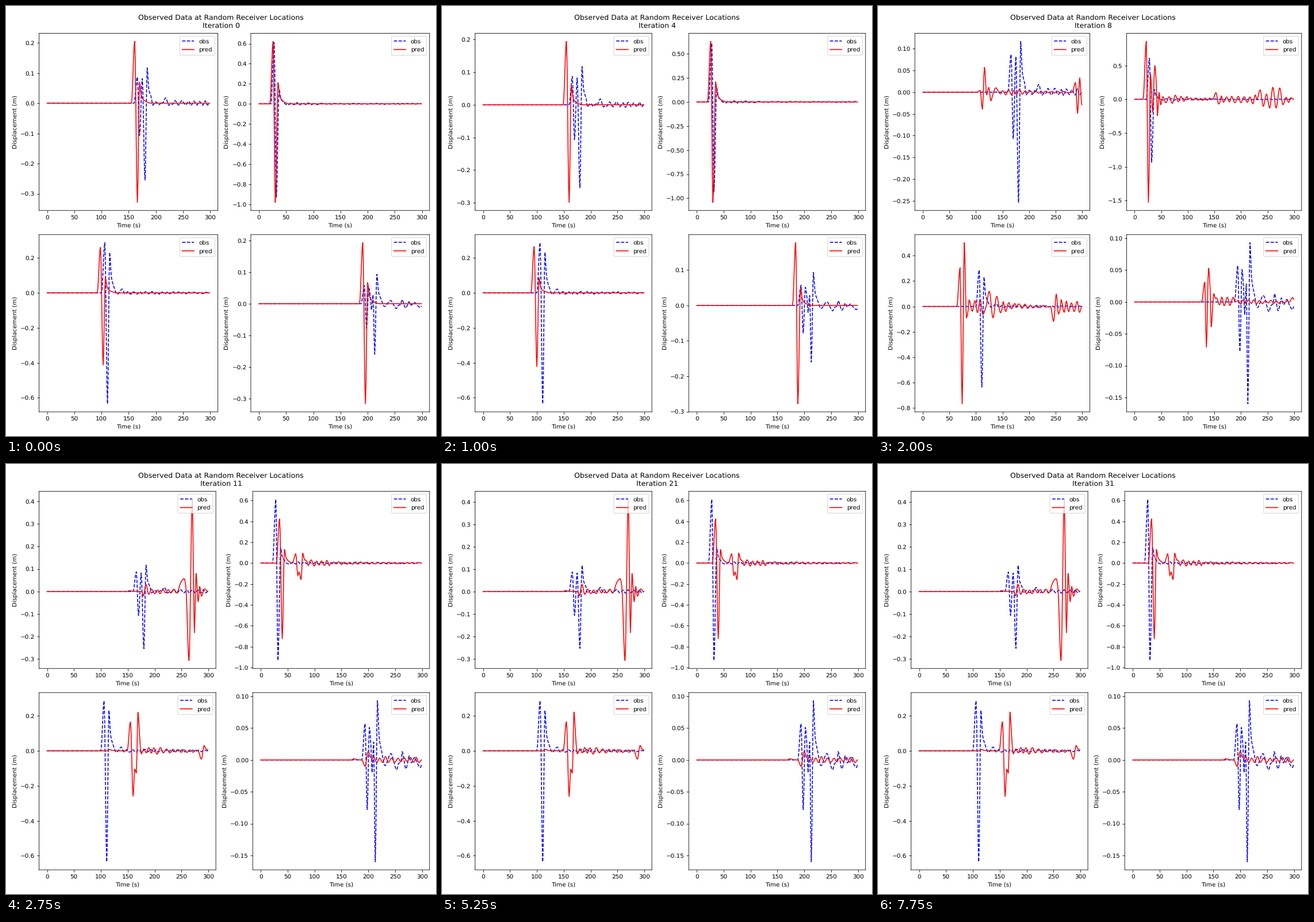
These frames come from a looping animation (748x748 px, 8 s). A matplotlib script:

```python
import numpy as np
import matplotlib.pyplot as plt
from matplotlib.animation import FuncAnimation

FRAMES, INTERVAL = 32, 250
T = np.arange(300)
PRE, POST = 6, ((3, 0.4), (8, 0.14), (22, 0))  # lead-in time, decaying tail


def burst(start, step, *amps):
    """Evenly spaced extremes in thousandths, with a decaying tail."""
    knots = [(round(start + i * step), a) for i, a in enumerate(amps)]
    end, last = knots[-1]
    return knots + [(end + dt, last * f) for dt, f in POST]


def ripple(start, end, amp, last=None):
    """Seeded swings of alternating sign, from size amp to size last."""
    rng = np.random.default_rng(start)
    last = amp if last is None else last
    knots, t = [], start
    while t < end:
        size = amp + (last - amp) * (t - start) / (end - start)
        knots.append((t, size * rng.uniform(0.5, 1) * (-1) ** len(knots)))
        t += rng.uniform(4, 6.5)
    return knots


def trace(*parts):
    """Join the parts and return a smooth curve without overshoot."""
    knots = [(0, 0)]
    for part in parts:
        start = part[0][0]
        knots = [k for k in knots if k[0] < start - 1]
        if knots[-1][0] < start - PRE:
            knots.append((start - PRE, 0))
        knots += part
    if knots[-1][0] < T[-1]:
        knots.append((T[-1], 0))
    k, v = np.array(knots, float).T
    v = v / 1000
    h = np.diff(k)
    d = np.diff(v) / h
    m = np.zeros_like(v)
    same = d[:-1] * d[1:] > 0
    m[1:-1][same] = (2 * d[:-1] * d[1:])[same] / (d[:-1] + d[1:])[same]

    def at(t):
        t = np.clip(t, k[0], k[-1])
        i = np.clip(np.searchsorted(k, t, "right") - 1, 0, len(h) - 1)
        s = (t - k[i]) / h[i]
        return (v[i] * (1 + 2 * s) * (1 - s) ** 2 + v[i + 1] * s * s * (3 - 2 * s)
                + h[i] * s * (1 - s) * (m[i] * (1 - s) - m[i + 1] * s))

    return at


class Panel:
    """One receiver: the prediction drifts early, breaks up, then settles."""

    def __init__(self, obs, first, fourth, wild, onset, settled, drift):
        self.obs = obs(T)
        self.first, self.fourth = np.array(first), np.array(fourth)
        self.wild, self.onset = wild, onset
        self.settled, self.drift = settled, drift

    def clean(self, n):
        p, up, down, back = self.first + (self.fourth - self.first) * n / 4
        return trace(burst(p, 4.5, up, -down, back))

    def pred(self, n):
        if n <= 4:
            return self.clean(n)(T)
        if n <= 8:
            u = ((n - 4) / 4) ** 1.6
            gap = self.fourth[0] - self.onset
            return ((1 - u) * self.clean(4)(T + u * gap)
                    + u * self.wild(T - (1 - u) * gap))
        w = max(0, 1 - 0.7 * (n - 8))
        scale = 1 - self.drift * 0.4 ** (n - 11)
        return w * self.wild(T) + (1 - w) * scale * self.settled(T)


top_left = Panel(
    obs=trace(burst(166, 4.5, 87, -107, 82, -254, 117), ripple(194, 213, -7),
              burst(218, 6, 18, -7), ripple(230, 296, -9)),
    first=(161, 205, 329, 70), fourth=(155, 194, 299, 59),
    wild=trace(burst(108, 4, 4, -39, 57, -6), burst(124, 4.5, 11, -20),
               burst(137, 9, 10, -4), ripple(150, 190, 7), ripple(192, 270, 3, 2),
               burst(287, 4, 22, -49, 33, -29)),
    onset=113,
    settled=trace(burst(154, 6, 4), burst(179, 5, -20, 32, -13, 10),
                  ripple(200, 242, -13), burst(249, 6, 42, 57),
                  burst(264, 6, -308, 411), burst(274, 3.3, -184, 80, -46, 22),
                  ripple(287, 298, -23)),
    drift=0.006)

top_right = Panel(
    obs=trace(burst(28, 4.4, 610, -932, 147), ripple(54, 115, -17, -8),
              ripple(118, 296, 5)),
    first=(26, 623, 983, 212), fourth=(25.7, 629, 1044, 209),
    wild=trace(burst(22, 4, 860, -1530, 370, -190, 500), burst(43, 3.2, -240, 100, -80),
               ripple(53, 104, 80, 40), ripple(106, 145, 20),
               burst(153, 4.5, 100, -70), ripple(163, 230, 55, 70),
               burst(236, 6.1, 140, -105, 80, -130, 180, -130, 170, -80),
               ripple(285, 297, 60, 30)),
    onset=22,
    settled=trace(burst(35, 4.6, 423, -725, 130), burst(65, 4, 90, -120),
                  burst(71, 3.6, -85, -157, 95), ripple(88, 132, -38, -25),
                  ripple(136, 296, 15, 5)),
    drift=0.001)

bottom_left = Panel(
    obs=trace(burst(106, 4.6, 287, -635, 232), ripple(129, 133, -12),
              burst(138, 5, 22, -6), ripple(148, 296, 9, 5)),
    first=(98.3, 260, 413, 89), fourth=(95, 265, 422, 86),
    wild=trace(burst(70, 4, 304, -767, 502, -90), ripple(87, 116, 65),
               burst(125, 7, 120, -90, 80, -50), ripple(151, 178, 50, 30),
               ripple(181, 232, 22, 8), burst(246, 4.6, -118, 98, -60),
               ripple(260, 297, 55)),
    onset=74,
    settled=trace(burst(117, 6, 8), burst(155, 5.3, 166, -261),
                  burst(163, 2.9, -105, -127, 222), ripple(175, 232, -22, -18),
                  ripple(234, 282, 10, 8), burst(287, 5, -48, 31)),
    drift=0.006)

bottom_right = Panel(
    obs=trace(burst(194, 4, 57, -78, 51), burst(207, 3.2, -20, 28, -160),
              burst(217, 4, 93), burst(231, 11, -9, 10, -15.5),
              burst(263, 7, 13, -14), ripple(276, 292, 7), burst(297, 4, -12)),
    first=(191.2, 193, 317, 67), fourth=(184, 177, 278, 48),
    wild=trace(burst(131.6, 3.7, 31, -71, 53), burst(144, 5, -39, 13),
               ripple(154, 190, 8), ripple(195, 288, 4, 2), burst(297, 4, 7)),
    onset=134,
    settled=trace(burst(174, 6, 2), burst(194, 5.5, -10, 14),
                  ripple(210, 240, 6), ripple(243, 297, 4, 5)),
    drift=0.01)

panels = (top_left, top_right, bottom_left, bottom_right)

# Unsnapped strokes and unhinted glyphs keep true fractional positions.
plt.rcParams.update({"path.snap": False, "text.hinting": "none"})
fig, grid = plt.subplots(2, 2, figsize=(10, 10), dpi=74.8)
title = fig.suptitle("")
pred_lines = []
for ax, panel in zip(grid.flat, panels):
    ax.plot(T, panel.obs, "b--", label="obs")
    pred_lines += ax.plot(T, panel.pred(0), "r-", label="pred")
    ax.set_xlabel("Time (s)")
    ax.set_ylabel("Displacement (m)")
    ax.legend(loc="upper right")


def draw(n):
    title.set_text(f"Observed Data at Random Receiver Locations\nIteration {n}")
    for ax, line, panel in zip(grid.flat, pred_lines, panels):
        line.set_ydata(panel.pred(n))
        ax.relim()
        ax.autoscale_view()
    fig.tight_layout()
    return pred_lines


anim = FuncAnimation(fig, draw, frames=FRAMES, interval=INTERVAL,
                     repeat=True, repeat_delay=0, blit=False)
plt.show()
```
